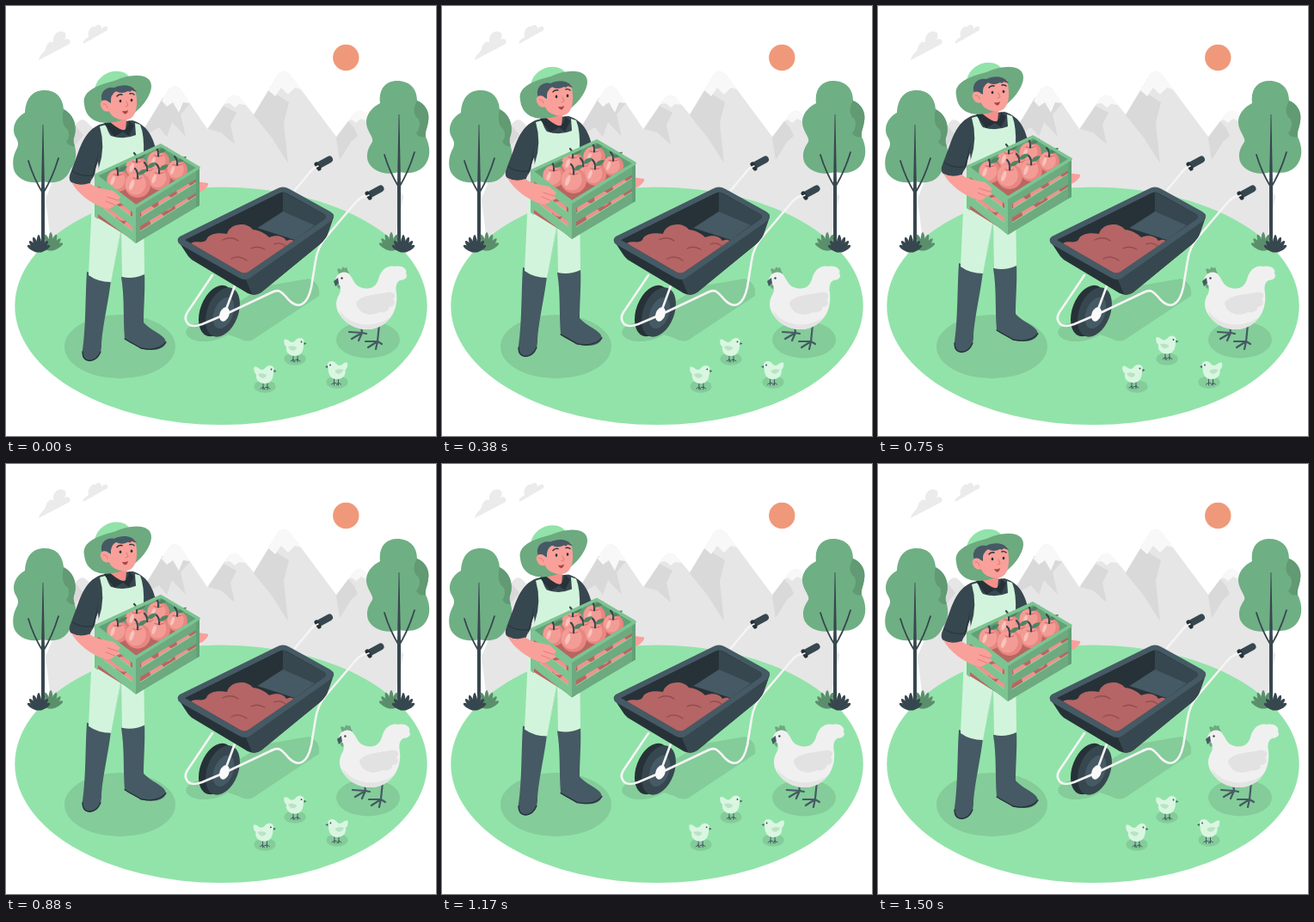
An HTML page for the animation above (1540 ms loop, 500 by 500 pixels).

```html
<!DOCTYPE html>
<html lang="en">
<head>
<meta charset="utf-8">
<title>Farmer</title>
<style>
html, body { margin: 0; width: 100%; height: 100%; overflow: hidden; background: #fff; }
svg { display: block; width: 100vw; height: 100vh; }
.line { fill: none; stroke-linecap: round; stroke-linejoin: round; }
</style>
</head>
<body>
<svg viewBox="0 0 500 500">
  <!-- mountains -->
  <path fill="#e6e6e6" d="M46 224L81 138Q88 127 96 137L118 158L152 155L189 98Q195 89 203 97L234 143L258 108Q265 100 272 107L288 126L316 80Q323 72 331 81L384 152L405 125Q412 118 419 127L462 222L448 290H54Z"/>
  <g fill="#d9d9d9">
    <path d="M182 107L154 155L178 141L187 152L193 135L209 152L203 126L214 113Z"/>
    <path d="M253 116L235 143L250 147L266 161L261 138L268 124Z"/>
    <path d="M306 97L288 127L309 153L328 183L323 136L329 112L318 105Z"/>
    <path d="M398 134L384 153L388 179L401 158L409 151L405 142Z"/>
    <path d="M81 139L66 174L77 166L90 150Z"/>
  </g>
  <g fill="#f8f8f8">
    <path d="M181 110L189 98Q195 89 203 97L214 113L206 112L201 124L194 112L187 117Z"/>
    <path d="M254 114L258 108Q265 100 272 107L279 115L271 114L266 118L260 113Z"/>
    <path d="M305 98L316 80Q323 72 331 81L343 97L336 95L328 103L320 95L313 105Z"/>
    <path d="M398 134L405 125Q412 118 419 127L423 136L413 131L407 136L402 132Z"/>
  </g>
  <!-- sky -->
  <g fill="#ebebeb">
    <path d="M38 63C39 56 44 55 46 50C47 44 51 40 55 42C54 34 60 28 66 30C71 31 70 36 68 39C73 37 76 40 74 44Z"/>
    <path d="M90 44C89 39 94 38 96 36C94 30 99 22 104 24C107 20 112 23 111 27C114 22 120 23 118 28Z"/>
  </g>
  <circle cx="395.300" cy="60" r="15.200" fill="#f0997a"/>
  <ellipse cx="250" cy="348.800" rx="239.700" ry="138.300" fill="#92e3a9"/>
  <!-- shadows -->
  <g fill="#84cc99">
    <ellipse cx="132.500" cy="396" rx="64.500" ry="37"/>
    <ellipse cx="421" cy="388" rx="37" ry="21.500"/>
    <ellipse cx="301" cy="442.500" rx="12.500" ry="7.300"/>
    <ellipse cx="336" cy="410.500" rx="12.500" ry="7.300"/>
    <ellipse cx="385" cy="437.500" rx="12.500" ry="7.300"/>
    <path d="M209 380C210 371 222 368 234 366L300 326L352 317Q366 322 364 337L290 386Q282 393 270 386L258 382C240 394 212 392 209 380Z"/>
  </g>
  <g id="trees"></g>
  <!-- wheelbarrow -->
  <g id="barrow">
    <path class="line" stroke="#f5f5f5" stroke-width="2.600" d="M336 214L352 195Q357 188 363 186M419 220Q411 223 406 229L372 269Q362 281 360 296L355 327C350 350 339 352 329 342C321 333 318 328 309 333"/>
    <ellipse cx="244.500" cy="354.500" rx="18.500" ry="31" transform="rotate(21 244.500 354.500)" fill="#263238"/>
    <ellipse cx="252" cy="356" rx="18" ry="30" transform="rotate(21 252 356)" fill="#37474f"/>
    <ellipse cx="253" cy="357" rx="11" ry="19" transform="rotate(21 253 357)" fill="#455a64"/>
    <path class="line" stroke="#f5f5f5" stroke-width="2.600" d="M240 313L211 356Q206 364 212 370Q217 374 228 370L254 359L309 333M268 320L254 358"/>
    <ellipse cx="254" cy="358.500" rx="5.500" ry="8.500" transform="rotate(21 254 358.500)" fill="#fafafa"/>
    <path fill="#263238" d="M200 273L212 291Q215 295 221 298L281 334Q289 338 296 333L364 278Q372 271 374 264L381 245L278 316Z"/>
    <path fill="#37474f" d="M278 316L381 245L375 263Q373 270 365 277L297 333Q291 337 286 335Z"/>
    <path fill="#455a64" d="M202 268L315 212.500Q322 208.500 329 212.500L377 239Q385 244 378 250L284 316Q278 320 271 316L202 277Q197 272 202 268Z"/>
    <path fill="#263238" d="M208 272L317 218Q322 215 327 218L370 242Q374 245 370 248L282 309Q277 312 272 309Z"/>
    <path fill="#37474f" d="M322 216L370 242Q374 245 370 248L336 272L292 258L322 239Z"/>
    <path fill="#455a64" d="M322 239L359 255L336 272L293 258Z"/>
    <path fill="#b56565" d="M215 276C222 272 228 277 233 272C235 265 246 263 257 265C260 253 279 250 287 260C296 261 302 265 306 269C315 265 324 268 326 273C332 270 336 273 333 274L282 309Q277 312 272 309Z"/>
    <path class="line" stroke="#934b4d" stroke-width="1.300" d="M252 272Q262 267 270 273M262 294Q270 289 280 296M285 282Q292 278 301 283M312 277Q319 274 325 279"/>
    <path class="line" stroke="#37474f" stroke-width="8" d="M365 184.500L376 178.500M424.500 218.500L435.500 212.500"/>
    <path class="line" stroke="#263238" stroke-width="5" d="M361 184L364 189M420 218L423 223"/>
    <path class="line" stroke="#f5f5f5" stroke-width="1.600" d="M359 188L363 186M417 222L422 220"/>
  </g>
  <!-- hen -->
  <g id="hen">
    <path class="line" stroke="#455a64" stroke-width="2.200" d="M413 372L414 380M399 379L414 380L402 387M414 380L410 389M434 370L432 390M418 390L432 390L421 397M432 390L430 399M432 390L437 393M414 380L419 381"/>
    <path fill="#6daa7f" d="M387 312L385 306Q388 304 390 307Q391 301 394 305Q397 302 397 307L399 311Z"/>
    <path fill="#f0f0f0" d="M383 319C384 311 392 307 398 311C404 316 404 324 412 327C423 331 430 327 433 318C436 306 444 301 452 303C462 301 467 307 465 311C468 315 464 319 458 319C453 322 453 328 454 334C456 350 449 366 434 373C422 379 404 376 394 366C382 354 382 344 388 334C390 328 389 327 386 325Z"/>
    <path fill="#e2e2e2" d="M407 345C414 335 431 336 443 333C452 332 455 337 450 341C454 345 451 350 445 350C446 355 440 357 434 356C423 362 409 358 407 345Z"/>
    <path fill="#e4e4e4" d="M388 354C399 372 426 376 447 362Q441 370 434 373C422 379 404 376 394 366Q388 360 388 354Z"/>
    <path fill="#455a64" d="M386 316L381 320L383 326L387 323Z"/>
    <path fill="#6daa7f" d="M385 323Q390 324 388 329Q384 328 385 323Z"/>
    <circle cx="390.500" cy="316.500" r="1.200" fill="#37474f"/>
  </g>
  <g id="chicks"></g>
  <!-- farmer -->
  <g id="farmer">
    <path fill="#455a64" d="M94 309L122 319C119 345 111 378 111 396C110 408 104 413 97 413C90 412 88 408 89 400C93 370 92 340 94 309ZM134 315L161 310C162 330 160 350 160 368C170 379 185 382 186 391C184 400 170 402 156 398C150 394 142 391 138 387C136 360 138 340 134 315Z"/>
    <path class="line" stroke="#263238" stroke-width="1.300" d="M89 402Q89 412 97 412.500Q106 412 110 402M138 387C146 392 151 394 157 398Q177 402 186 391"/>
    <path fill="#d3f4dc" d="M100 228L160 228L161 312Q148 318 135 315L134 258L122 321Q107 321 96 313Z"/>
    <path class="line" stroke="#b5ddc0" stroke-width="1" d="M134 262L127 296"/>
    <path fill="#37474f" d="M116 136C99 139 91 151 84 170L74 197Q73 203 76 205Q86 210 97 208L107 181L111 220H160L174 166C169 146 160 137 147 133Z"/>
    <path fill="#263238" d="M108 167L103 196L99 203L105 180Z"/>
    <path class="line" stroke="#263238" stroke-width="1" d="M77 192Q87 199 100 197"/>
    <path fill="#d3f4dc" d="M109 140L116 138Q119 148 122 151Q137 156 151 150L150 136L156 138Q161 150 160 173L161 246H99L108 188Q116 164 109 140Z"/>
    <path fill="#f58f8b" d="M121 119L141 124L139 144Q129 145 121 137Z"/>
    <path fill="#263238" d="M118 132Q128 142 137 145Q142 141 143 133L149 139L143 151L136 146L126 152L114 137Z"/>
    <!-- head -->
    <path fill="#92e3a9" d="M103 96C107 78 128 71 140 79L148 86L130 104Z"/>
    <path fill="#6daa7f" d="M91 114C88 99 106 92 126 87C148 77 170 79 169 94C168 108 152 125 139 131C115 141 93 136 91 114Z"/>
    <path fill="#f9a09a" d="M120 101L150 96C153 108 153 120 149 126C145 134 135 134 127 130Q121 127 119 120Z"/>
    <path fill="#455a64" d="M112 111C108 101 116 93 126 95C136 90 148 92 152 100Q149 99 146 98Q145 101 142 99Q134 103 128 99Q121 103 122 113L117 110Z"/>
    <path fill="#f9a09a" d="M120 113C117 107 108 109 110 116Q113 125 121 122Z"/>
    <path class="line" stroke="#e57874" stroke-width="1" d="M113 114Q117 113 118 118M140 111L142 116L139 117"/>
    <path class="line" stroke="#263238" stroke-width="1.400" d="M129 105Q131 102 135 103M144 102Q147 101 149 103"/>
    <ellipse cx="133" cy="110.500" rx="1.300" ry="1.800" fill="#263238"/>
    <ellipse cx="146" cy="109.500" rx="1.300" ry="1.800" fill="#263238"/>
    <path fill="#a84646" d="M135 122Q139 123 142 121Q141 126 138 125.500Q136 125 135 122Z"/>
    <path fill="#f9a09a" d="M221 204L235 206Q236 208 232 212Q228 217 221 217Z"/>
    <g id="crate"></g>
    <path fill="#f9a09a" d="M76 205Q86 210 97 206C104 212 116 213 125 215L133 222Q132 225 130 225L133 229Q130 231 127 231Q122 237 114 235C100 230 84 219 76 205Z"/>
    <path class="line" stroke="#e57874" stroke-width="0.900" d="M118 222L130 226M116 227L126 231"/>
  </g>
</svg>
<script>
const $ = id => document.getElementById(id);
const path = (d, fill) => `<path d="${d}" fill="${fill}"/>`;
const line = (d, color, w) => `<path class="line" d="${d}" stroke="${color}" stroke-width="${w}"/>`;

function tuft(x, y, len, color) {
  let out = '';
  for (let i = -3; i <= 3; i++) {
    const ry = len / 2 - Math.abs(i) * 0.8;
    out += `<ellipse cx="${x}" cy="${y - ry}" rx="2.500" ry="${ry}" fill="${color}"
      transform="rotate(${i * 20} ${x} ${y})"/>`;
  }
  return out;
}

function tree(x, canopy, shade, top, fork, dir) {
  return path(canopy, '#6faf84') + path(shade, '#619a73') +
    path(`M${x - 2} 274V${fork}L${x - 0.4} ${top}H${x + 0.4}L${x + 2} ${fork}V274Z`, '#37474f') +
    line(`M${x} ${fork + 4}Q${x - 11} ${fork - 14} ${x - 17} ${fork - 34}M${x} ${fork + 4}Q${x + 11} ${fork - 14} ${x + 18} ${fork - 37}`, '#37474f', 1.8) +
    tuft(x + 9 * dir, 284, 21, '#5b8f6c') + tuft(x - 5 * dir, 286, 20, '#37474f');
}

$('trees').innerHTML =
  tree(43,
    'M45 98C58 98 66 106 67 120C77 125 83 137 80 150C78 155 78 158 80 163C83 175 80 184 75 190C70 203 58 208 43 204C28 208 13 202 9 190C7 180 9 172 13 165C15 160 14 157 11 152C6 142 11 130 22 124C23 108 30 98 45 98Z',
    'M67 120C77 125 83 137 80 150C78 155 78 158 80 163Q74 164 70 158Q75 152 72 144Q63 138 67 120Z',
    138, 214, 1) +
  tree(457,
    'M455 87C469 87 478 96 478 110C488 114 493 124 491 134C490 142 487 146 488 152C493 162 494 174 489 182C483 193 470 196 457 193C441 198 426 192 421 181C418 171 422 164 426 158C428 152 418 145 419 133C420 124 427 117 435 113C433 97 441 87 455 87Z',
    'M478 110C488 114 493 124 491 134C490 142 487 146 488 152Q481 154 477 148Q483 140 480 132Q470 124 478 110Z',
    126, 207, -1);

function apple(x, y, r) {
  return `<circle cx="${x}" cy="${y}" r="${r}" fill="#e98681"/>` +
    `<ellipse cx="${x - r * 0.15}" cy="${y - r * 0.08}" rx="${r * 0.8}" ry="${r * 0.85}" fill="#f39c96"/>` +
    `<ellipse cx="${x - r * 0.45}" cy="${y}" rx="${r * 0.16}" ry="${r * 0.42}" transform="rotate(20 ${x - r * 0.45} ${y})" fill="#f9c3bb"/>` +
    line(`M${x - 5} ${y - r * 0.55}Q${x} ${y - r * 0.35} ${x + 5} ${y - r * 0.55}`, '#d0625f', 1) +
    line(`M${x} ${y - r * 0.5}Q${x + 1} ${y - r} ${x - 3} ${y - r - 4}`, '#37474f', 2.2) +
    path(`M${x} ${y - r * 0.75}q2 -8 11 -7q-2 7 -11 7Z`, '#4f8562');
}

function crate() {
  const apples = [[152, 188, 13], [177, 181, 13], [130, 203, 13], [199, 191, 12], [164, 197, 11],
    [178, 201, 13], [153, 208, 15]];
  const low = [[118, 226], [136, 241], [166, 241], [186, 229], [207, 214], [121, 241], [145, 258], [176, 249], [205, 231]];
  let out = path('M103 197L180 161L225 188V230L151 274L103 244Z', '#b86662') +
    path('M103 197L180 161L225 188L218 198L180 174L112 207Z', '#62a077') +
    low.map(([x, y]) => `<circle cx="${x}" cy="${y}" r="9" fill="#ee938d"/>`).join('') +
    apples.map(a => apple(...a)).join('');
  for (const [o, h] of [[0, 9], [15, 10], [31, 11]]) {
    out += path(`M103 ${197 + o}L151 ${234 + o}V${234 + o + h}L103 ${197 + o + h}Z`, '#7cc491') +
      path(`M151 ${234 + o}L225 ${188 + o}V${188 + o + h + 2}L151 ${234 + o + h}Z`, '#6daa7f') +
      line(`M103.500 ${197 + o}L151 ${234 + o}L224.500 ${188 + o}`, '#8ad9a0', 1);
  }
  out += path('M147 231L151 234V276L147 273Z', '#7cc491') + path('M151 234L156 231V273L151 276Z', '#6daa7f') +
    path('M103 197L107 200V248L103 245Z', '#7cc491') + path('M221 190L225 188V232L221 234Z', '#62a077');
  return out + line('M104 197L180 162L224 188L151 233Z', '#7cc491', 3.6);
}
$('crate').innerHTML = crate();

// Drawn facing right, around the centre of its shadow
const chick = line('M-2 -5V2M3 -5V2M-5 3L-2 1L0 4M0 2L3 1L6 3M-2 1V4M3 1V4', '#455a64', 1) +
  path('M-12.500 -22C-9 -24 -7 -19 -3 -19C0 -19 1 -24 6 -24C10 -24 12 -20 10 -16C10 -9 7 -3 0 -3C-8 -3 -11 -9 -10 -14C-13 -16 -13 -20 -12.500 -22Z', '#d9f6e1') +
  path('M-8 -14C-5 -15 -1 -15 2 -13C2 -9 -5 -7 -8 -14Z', '#b9e3c5') +
  path('M10.500 -19L13.500 -17.500L10.500 -16Z', '#455a64') +
  '<circle cx="7.500" cy="-19.500" r="0.900" fill="#37474f"/>';

// home x, home y, facing, reach x, reach y
const flock = [[301, 442, 1, -4, -1], [336, 410, 1, 0, -2.5], [384.5, 437, -1, 3, 0]];
$('chicks').innerHTML = flock.map(() => `<g>${chick}</g>`).join('');
const birds = [...$('chicks').children];

function ease(x) {
  const bez = (a, b, s) => 3 * a * s * (1 - s) ** 2 + 3 * b * s * s * (1 - s) + s ** 3;
  let lo = 0, hi = 1;
  for (let i = 0; i < 24; i++) {
    const mid = (lo + hi) / 2;
    if (bez(0.36, 0.19, mid) < x) lo = mid; else hi = mid;
  }
  return bez(0.07, 0.97, lo);
}

const stops = [0, -1, 2, -4, 4, -4, 4, -4, 2, -1, 0];
function shake(p) {
  const i = Math.min(9, Math.floor(p * 10));
  return stops[i] + (stops[i + 1] - stops[i]) * ease(p * 10 - i);
}

const move = (el, x, y, extra = '') =>
  el.setAttribute('transform', `translate(${x.toFixed(2)} ${y.toFixed(2)})${extra}`);

function draw(ms) {
  const t = Math.min(ms % 1540, 1500);
  const p = t / 1500;
  move($('farmer'), 0, -10 * (1 - Math.abs(1 - 2 * p)));
  move($('hen'), shake(p), 0);
  const hop = (0.5 + 0.5 * Math.cos(2 * Math.PI * (t - 210) / 540)) ** 3;
  flock.forEach(([x, y, face, dx, dy], i) =>
    move(birds[i], x + dx * hop, y + dy * hop, ` scale(${face} 1)`));
}

const start = performance.now();
function tick() {
  draw(performance.now() - start);
  requestAnimationFrame(tick);
}
tick();
</script>
</body>
</html>
```
